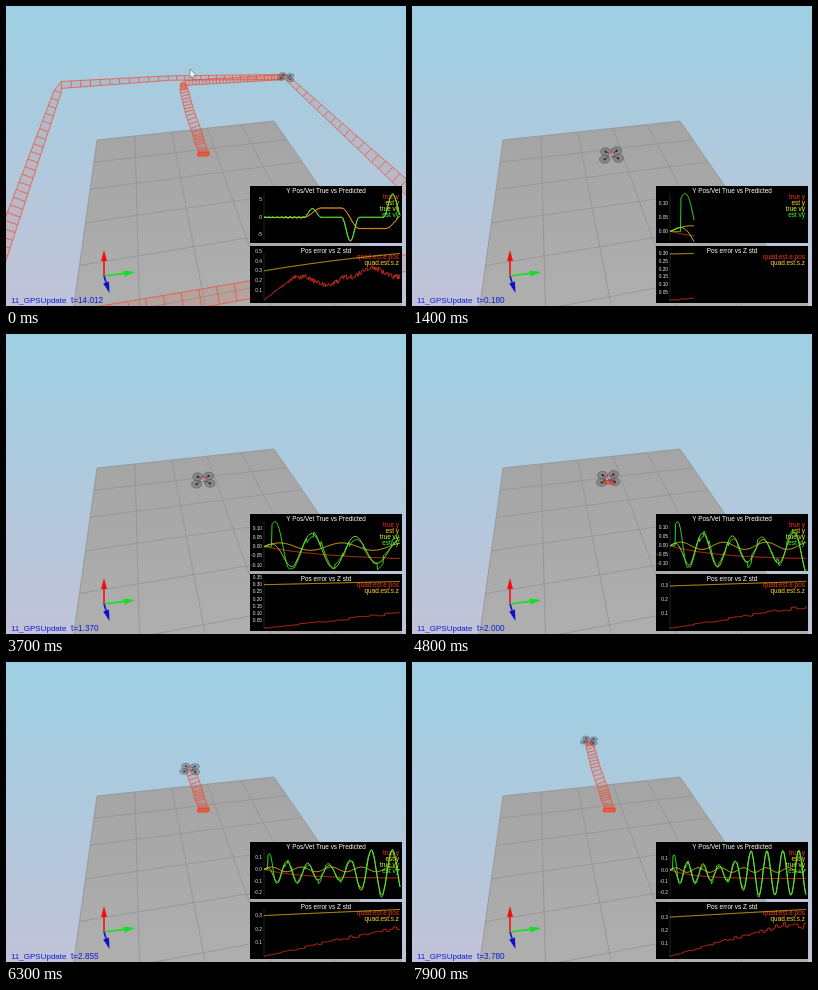
An HTML page with a canvas that plays this animation: 400x300 px, repeating every 8000 ms.

```html
<!DOCTYPE html>
<html>
<head>
<meta charset="utf-8">
<style>
html, body { margin: 0; height: 100%; overflow: hidden; }
canvas { display: block; width: 100vw; height: 100vh; }
</style>
</head>
<body>
<canvas id="stage"></canvas>
<script>
const stage = document.getElementById('stage'), c = stage.getContext('2d');
const RED = '#ef4a32', FONT = '"Liberation Sans", Arial, sans-serif';

// wall clock (s), simulated time
const clock = [[0, 14.012], [.999, 14.5], [1, 0], [1.4, .18], [3, .975], [3.7, 1.37],
  [4.8, 2], [6.3, 2.855], [7.9, 3.78], [8, 3.84]];

// flight: time, x, y, half width of the ribbon
const path = [[0, 199.5, 149.5, 5], [2, 196, 144.5, 5], [2.5, 191.5, 128, 4.8],
  [2.855, 184, 107, 4.5], [3.37, 178, 84, 4], [3.9, 177, 77, 2.5], [6, 280, 71, 2.5],
  [7.9, 470, 245, 8], [9.9, -36, 332, 10], [12.2, 54, 79, 3.5], [13, 165, 72, 2.2],
  [14.012, 280, 71, 2.5], [14.5, 285, 76, 3]];

function at(rows, t) {
  let i = 1;
  while (i < rows.length - 1 && rows[i][0] <= t) i++;
  const a = rows[i - 1], b = rows[i], k = (t - a[0]) / (b[0] - a[0]);
  return a.slice(1).map((v, j) => v + (b[j + 1] - v) * k);
}

const part = (t, a, b) => Math.max(0, Math.min(1, (t - a) / (b - a)));
const ease = (t, a, b) => { const k = part(t, a, b); return k * k * (3 - 2 * k); };
const bump = (t, a, b) => Math.sin(Math.PI * part(t, a, b)) ** 2;
const rand = n => { const v = Math.sin(n * 91.7 + 3) * 4375.5; return v - Math.floor(v) - .5; };

// velocity: a wobble in hover, then one burst for each sideways leg
function velocity(t) {
  const swing = .095 + .1 * ease(t, 1.7, 2.3) - .035 * bump(t, .6, 2);
  const wobble = swing * Math.cos(2 * Math.PI * (t - .48) / .443) - .025;
  return wobble * (1 - ease(t, 3.9, 4.3))
    + 2.5 * bump(t, 4.1, 5.9) - 6.8 * bump(t, 8, 9.8) + 6.7 * bump(t, 12.3, 14.2);
}
const trueV = t => velocity(t) * part(t, 0, .3);
const estV = t => t < .08 ? 0
  : velocity(t) + .13 * bump(t, .02, .26) + rand(Math.floor(t * 10)) * .07 * (1 - t * 7 % 1) * part(t, .2, .4);
const legs = t => 2.7 * ease(t, 4.1, 5.9) - 5.9 * ease(t, 8, 9.8) + 5 * ease(t, 12.5, 14.8);
const estY = t => legs(t) + .02 * Math.sin(t * 10);
const trueY = t => legs(t) - .075 * (1 - Math.exp(-t * 1.4));

const spread = t => .3 + .0165 * t - .00027 * t * t;
function miss(t) {
  const n = Math.floor(t * 14), s = n / 14 + (t - n / 14) * .3;
  const base = Math.min(.078 * s, .24 - .08 * bump(s, 4, 8.8) + .09 * bump(s, 9, 13.4));
  return Math.max(0, base + rand(n) * Math.min(.055, s * .015));
}

function line(points, color, width = 1) {
  c.beginPath();
  points.forEach(p => c.lineTo(p[0], p[1]));
  c.strokeStyle = color;
  c.lineWidth = width;
  c.stroke();
}

function poly(points, fill) {
  c.beginPath();
  points.forEach(p => c.lineTo(p[0], p[1]));
  c.fillStyle = fill;
  c.fill();
}

function text(s, x, y, size, color, align = 'left') {
  c.font = size + 'px ' + FONT;
  c.textAlign = align;
  c.fillStyle = color;
  c.fillText(s, x, y);
}

function shade(y0, y1, a, b) {
  const g = c.createLinearGradient(0, y0, 0, y1);
  g.addColorStop(0, a);
  g.addColorStop(1, b);
  return g;
}

// floor grid in perspective: column i, row j
function floorAt(i, j) {
  const x = 91 + 38.6 * i - .64 * i * i, y = 134 - (x - 91) * .107;
  const k = 1 / (1 - .0885 * j * (y + 95) / 229);
  return [123 + (x - 123) * k, -95 + (y + 95) * k];
}

function scene() {
  c.fillStyle = shade(0, 300, '#9dcfe2', '#c1c3d8');
  c.fillRect(0, 0, 400, 300);
  poly([floorAt(0, 0), floorAt(5, 0), floorAt(5, 7), floorAt(0, 7)], shade(115, 300, '#a4a4a4', '#afafaf'));
  for (let i = 0; i < 8; i++) {
    if (i < 6) line([floorAt(i, 0), floorAt(i, 7)], '#929292', .8);
    line([floorAt(0, i), floorAt(5, i)], '#929292', .8);
  }
}

function arrow(x, y, color) {
  const dx = x - 98, dy = y - 270, n = Math.hypot(dx, dy), u = dx / n, v = dy / n;
  const bx = x - u * 11, by = y - v * 11;
  line([[98, 270], [bx, by]], color, 1.6);
  poly([[x, y], [bx - v * 3, by + u * 3], [bx + v * 3, by - u * 3]], color);
}

// ribbon with rungs square to the flight direction
function trail(t) {
  const left = [], right = [];
  for (let s = 1.5; s <= t; s += .07) {
    const [x, y, w] = at(path, s), [x0, y0] = at(path, s - .01), [x1, y1] = at(path, s + .01);
    const n = Math.hypot(x1 - x0, y1 - y0), hover = s < 2.2;
    const ux = hover ? 1 : (y0 - y1) / n, uy = hover ? 0 : (x1 - x0) / n;
    const ox = hover ? rand(s) * 3 + 1 : 0, oy = hover ? rand(s + 9) * 4 + 3 : 0;
    const a = [x + ux * w + ox, y + uy * w + oy], b = [x - ux * w + ox, y - uy * w + oy];
    if (left.length) poly([left.at(-1), a, b, right.at(-1)], 'rgba(239,74,50,.13)');
    left.push(a);
    right.push(b);
    line([a, b], RED, .7);
  }
  line(left, RED, .7);
  line(right, RED, .7);
}

function drone(t) {
  const [x, y] = at(path, t);
  const far = part(149 - y, 0, 75), s = 1 - .3 * far;
  c.save();
  c.translate(x, y);
  c.scale(s, s * (.95 - .25 * far));
  c.rotate(.25 * far);
  const hubs = [[-5.5, -3.5], [5.5, -4.5], [-6.5, 4.5], [7, 3.5]];
  for (const [hx, hy] of hubs) {
    c.beginPath();
    c.ellipse(hx, hy, 5.2, 4.2, 0, 0, 7);
    c.fillStyle = 'rgba(90,90,95,.4)';
    c.fill();
    c.strokeStyle = 'rgba(70,70,75,.55)';
    c.lineWidth = .8;
    c.stroke();
  }
  line([hubs[0], hubs[3]], '#444448', 1);
  line([hubs[1], hubs[2]], '#444448', 1);
  for (const [hx, hy] of hubs) {
    c.fillStyle = '#222';
    c.fillRect(hx - 1, hy - 1, 2, 2);
  }
  c.fillStyle = '#e0a3a8';
  c.fillRect(-2, -2, 4, 3.5);
  line([[0, 0], [-1, -4]], '#d33', 1);
  line([[0, 0], [2, 3]], '#33b', 1);
  c.restore();
}

function curve(f, t, y, color) {
  const points = [], span = Math.max(1, t);
  for (let x = 0; x <= 136 * t / span; x += .5) {
    points.push([258 + x, y(f(x / 136 * span))]);
  }
  line(points, color, .9);
}

function panel(top, title, names) {
  c.fillStyle = '#000';
  c.fillRect(244, top, 152, 57);
  line([[258, top + 7], [258, top + 55]], '#444', .5);
  text(title, 320, top + 6.5, 6.4, '#fff', 'center');
  names.forEach(([s, color], i) => text(s, 393, top + 12.5 + 6 * i, 6.4, color, 'right'));
}

function ticks(lo, hi, step, y, digits) {
  for (let n = Math.ceil(lo / step); n * step <= hi; n++) {
    text((n * step).toFixed(digits), 256, y(n * step) + 1.5, 4.8, '#eee', 'right');
  }
}

function plots(t) {
  let lo = -.034, hi = .11;
  for (let s = 0; s <= t; s += .02) {
    lo = Math.min(lo, estV(s));
    hi = Math.max(hi, estV(s));
  }
  const size = hi - lo, y1 = v => 235 - 47 * (v - lo) / size;
  const step = size < .36 ? .05 : size < 1 ? .1 : 5;
  panel(180, 'Y Pos/Vet True vs Predicted',
    [['true y', '#ff3018'], ['est y', '#ffe000'], ['true vy', '#d8ff20'], ['est vy', '#40ff30']]);
  ticks(lo, hi, step, y1, step < .1 ? 2 : step < 1 ? 1 : 0);
  curve(trueY, t, y1, '#e03a18');
  curve(estY, t, y1, '#f0c020');
  curve(trueV, t, y1, '#b8f040');
  curve(estV, t, y1, '#38f028');

  const top = spread(t), y2 = v => 294 - 46.5 * v / top, fine = top < .325;
  panel(240, 'Pos error vs Z std', [['quad.est.e.pos', '#ff3018'], ['quad.est.s.z', '#ffd820']]);
  ticks(.01, top * 1.09, fine ? .05 : .1, y2, fine ? 2 : 1);
  curve(spread, t, y2, '#f0b818');
  curve(miss, t, y2, '#d83018');
}

function cursor() {
  const p = [[184, 63], [184, 72], [186, 70.3], [187.5, 73.5], [189, 72.8], [187.5, 69.8], [190, 69.5], [184, 63]];
  poly(p, '#fff');
  line(p, '#555', .6);
}

function draw(now) {
  const wall = Math.floor(now % 8000 / 100) / 10;
  const t = at(clock, wall)[0];
  const k = Math.max(1, devicePixelRatio);
  if (stage.width !== 400 * k) {
    stage.width = 400 * k;
    stage.height = 300 * k;
  }
  c.setTransform(k, 0, 0, k, 0, 0);
  c.lineJoin = 'round';
  scene();
  trail(t);
  drone(t);
  arrow(98, 244, '#f01010');
  arrow(129, 266, '#10e020');
  arrow(103.5, 287, '#1010c8');
  plots(t);
  text('11_GPSUpdate', 5, 297, 8, '#1018d8');
  text('t=' + t.toFixed(3), 65, 297, 8.2, '#1018d8');
  if (wall < 1) cursor();
}

const start = performance.now();
function loop() {
  draw(performance.now() - start);
  requestAnimationFrame(loop);
}
loop();
</script>
</body>
</html>
```
